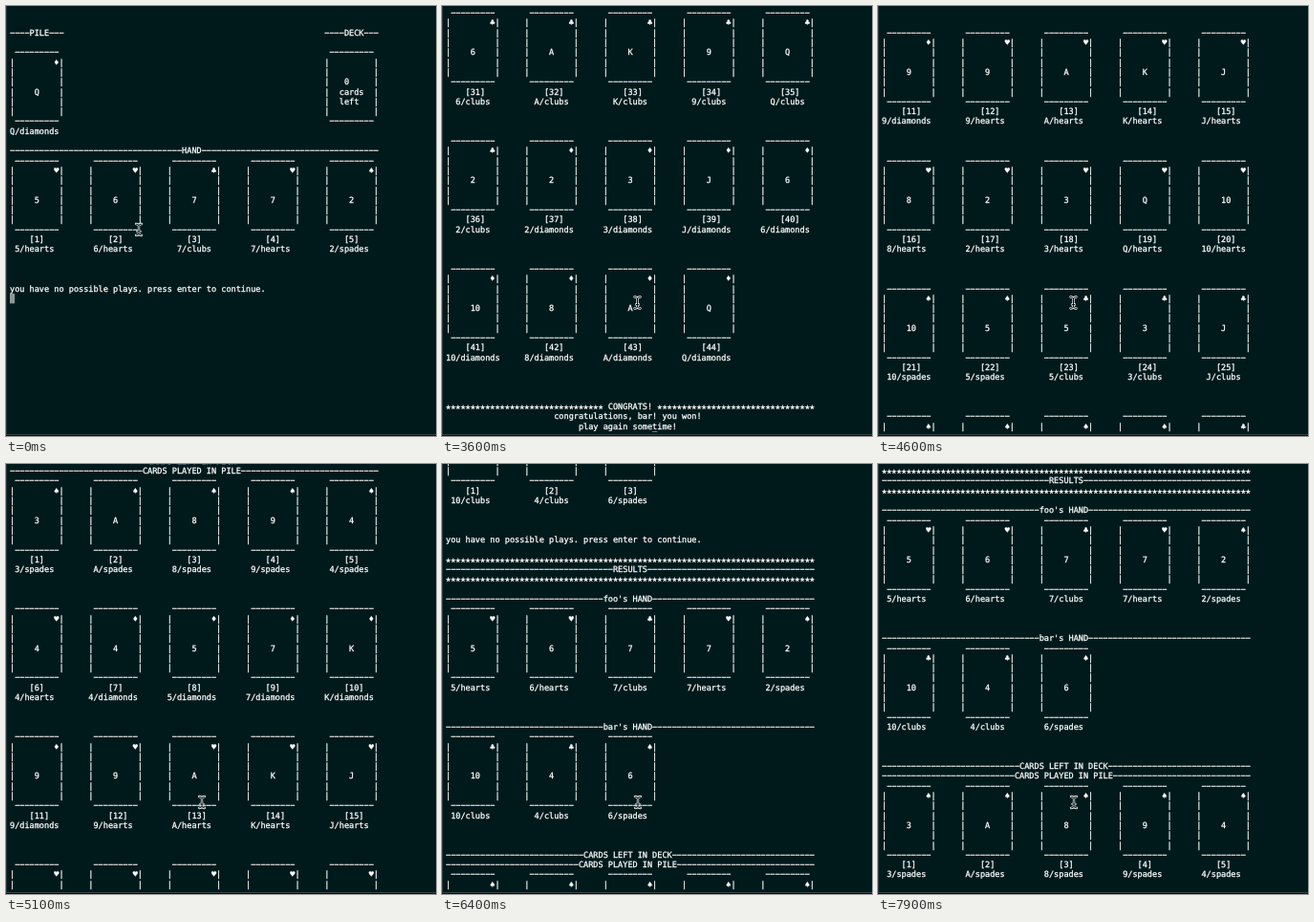
Write an HTML page that moves like this. It is 450 px wide and 450 px high and loops after 8 s.

```html
<!DOCTYPE html>
<html lang="en">
<head>
<meta charset="utf-8">
<title>Card game in a terminal</title>
<style>
  html, body { margin: 0; width: 100%; height: 100%; overflow: hidden; background: #001a1c; }
  svg { display: block; width: 100vw; height: 100vh; }
  text {
    font-family: "DejaVu Sans Mono", "Liberation Mono", monospace;
    font-size: 8.55px;
    fill: #fff;
    stroke: #fff;
    stroke-width: .28px;
    white-space: pre;
    text-rendering: geometricPrecision;
  }
</style>
</head>
<body>
<svg viewBox="0 0 450 450">
  <defs>
    <clipPath id="window"><rect width="450" height="446"/></clipPath>
    <path id="beam" d="M-3 -6Q0 -6 0 -4Q0 -6 3 -6M0 -4V4M-3 6Q0 6 0 4Q0 6 3 6M-1.5 2H1.5"/>
  </defs>
  <rect width="450" height="450" fill="#001a1c"/>
  <g id="screen" clip-path="url(#window)"></g>
  <rect width="1" height="448" fill="#2a3a3c"/>
  <rect y="448" width="450" height="1" fill="#364244"/>
  <rect y="449" width="450" height="1" fill="#0b1213"/>
  <g id="pointer" fill="none" stroke-linecap="round">
    <use href="#beam" stroke="#fff" stroke-width="2.3"/>
    <use href="#beam" stroke="#001012" stroke-width="1"/>
  </g>
</svg>
<script>
const SVG = 'http://www.w3.org/2000/svg';
const LOOP = 8000, STEP = 100;
const COLS = 75, CELL_W = 5.147, CELL_H = 10.3, LEFT = 4, TOP = 2.3, BASELINE = 7.9;
const SUITS = {
  h: ['♥', 'hearts'], d: ['♦', 'diamonds'], c: ['♣', 'clubs'], s: ['♠', 'spades']
};
const FOO = '5h 6h 7c 7h 2s'.split(' ');
const BAR = '10c 4c 6s'.split(' ');
const PILE = ('3s As 8s 9s 4s 4h 4d 5d 7d Kd 9d 9h Ah Kh Jh 8h 2h 3h Qh 10h 10s 5s 5c 3c Jc ' +
  'Js Qs Ks 7s 8c 6c Ac Kc 9c Qc 2c 2d 3d Jd 6d 10d 8d Ad Qd').split(' ');

const center = (text, width) => ' '.repeat((width - text.length) >> 1) + text;
const rule = title => center(title, COLS).replace(/^ +/, s => '-'.repeat(s.length)).padEnd(COLS, '-');
const blank = n => Array(n).fill('');
const side = text => '|' + text.padEnd(9) + '|';
const edge = ' ' + '-'.repeat(9);

function card(code) {
  const [mark, name] = SUITS[code.slice(-1)];
  const rank = code.slice(0, -1);
  const empty = side('');
  return [edge, side(' '.repeat(8) + mark), empty, empty, side('    ' + rank),
    empty, empty, edge, center(rank + '/' + name, 11)];
}

// Lays blocks of lines next to each other.
const beside = (blocks, pitch = 16) =>
  blocks[0].map((_, i) => blocks.map(b => (b[i] || '').padEnd(pitch)).join('').trimEnd());

function deal(cards, first) {
  return beside(cards.map((code, i) => {
    const lines = card(code);
    if (first) lines.splice(8, 0, `    [${first + i}]`);
    return lines;
  }));
}

function board(hand) {
  const pile = ['----PILE---', '', ...card('Qd')];
  const deck = ['----DECK---', '', edge, side(''), side(''), side('   0'), side('  cards'),
    side('  left'), side(''), edge];
  return [...beside([pile, deck], 64), '', rule('HAND'), ...deal(hand, 1), ...blank(3),
    'you have no possible plays. press enter to continue.', ''];
}

function results() {
  const stars = '*'.repeat(COLS);
  const wing = '*'.repeat(32);
  const lines = [stars, rule('RESULTS'), stars, '',
    rule("foo's HAND"), ...deal(FOO), ...blank(3),
    rule("bar's HAND"), ...deal(BAR), ...blank(3),
    rule('CARDS LEFT IN DECK'), rule('CARDS PLAYED IN PILE')];
  for (let i = 0; i < PILE.length; i += 5) {
    lines.push(...deal(PILE.slice(i, i + 5), i + 1), ...blank(3));
  }
  return [...lines, '', `${wing} CONGRATS! ${wing}`,
    center('congratulations, bar! you won!', COLS),
    center('play again sometime!', COLS),
    '(base) QT38wmke:wildmatches mirandaholte$ '];
}

function add(parent, tag, attrs) {
  const node = document.createElementNS(SVG, tag);
  for (const key in attrs) node.setAttribute(key, attrs[key]);
  return parent.appendChild(node);
}

const screen = document.getElementById('screen');
const pointer = document.getElementById('pointer');

// One terminal page with a block cursor after its last line.
function page(lines) {
  const group = add(screen, 'g', {});
  const last = lines.length - 1;
  add(group, 'rect', {
    x: LEFT + lines[last].length * CELL_W, y: TOP + last * CELL_H,
    width: CELL_W, height: CELL_H, fill: '#8f9798'
  });
  lines.forEach((line, i) => {
    if (!line) return;
    add(group, 'text', { x: LEFT, y: TOP + i * CELL_H + BASELINE })
      .textContent = line.replace(/-/g, '−').replace(/\*/g, '★');
  });
  return group;
}

const pages = [board(FOO), board(BAR), [...board(BAR), ...results()]].map(page);

const linear = u => u;
const speedUp = u => u * u;
const slowDown = u => 1 - (1 - u) ** 1.5;
const smooth = u => u * u * (3 - 2 * u);

// Each burst starts at a time and reaches its goal after a number of steps.
const HOME_ROW = -2, END_ROW = 139;
const scrolls = [
  { start: 3600, steps: 3, goal: [131], ease: speedUp },
  { start: 4000, steps: 4, goal: [88], ease: linear },
  { start: 4600, steps: 3, goal: [76], ease: linear },
  { start: 5000, steps: 8, goal: [27], ease: slowDown },
  { start: 6400, steps: 3, goal: [4], ease: linear },
  { start: 7200, steps: 3, goal: [17], ease: speedUp },
  { start: 7800, steps: 2, goal: [28], ease: linear }
];
const moves = [
  { start: 100, steps: 2, goal: [134.5, 154], ease: smooth },
  { start: 300, steps: 1, goal: [138, 161], ease: linear },
  { start: 2500, steps: 4, goal: [204.5, 310.5], ease: smooth },
  { start: 5000, steps: 1, goal: [205, 354], ease: linear }
];

function follow(bursts, from, time) {
  return bursts.reduce((value, { start, steps, goal, ease }) => {
    const done = Math.floor((time - start) / STEP) + 1;
    const u = ease(Math.min(1, Math.max(0, done / steps)));
    return value.map((v, i) => v + (goal[i] - v) * u);
  }, from);
}

function draw(time) {
  const shown = time < 600 ? 0 : time < 1700 ? 1 : 2;
  const row = shown < 2 ? HOME_ROW : Math.round(follow(scrolls, [END_ROW], time)[0]);
  pages.forEach((p, i) => p.setAttribute('display', i === shown ? 'inline' : 'none'));
  pages[shown].setAttribute('transform', `translate(0 ${-row * CELL_H})`);

  // Typing hides the pointer until it moves again.
  const typing = time >= 600 && time < 2400;
  pointer.setAttribute('display', typing ? 'none' : 'inline');
  pointer.setAttribute('transform', `translate(${follow(moves, [139, 234], time)})`);
}

const start = performance.now();
function tick() {
  draw((performance.now() - start) % LOOP);
  requestAnimationFrame(tick);
}
tick();
</script>
</body>
</html>
```
